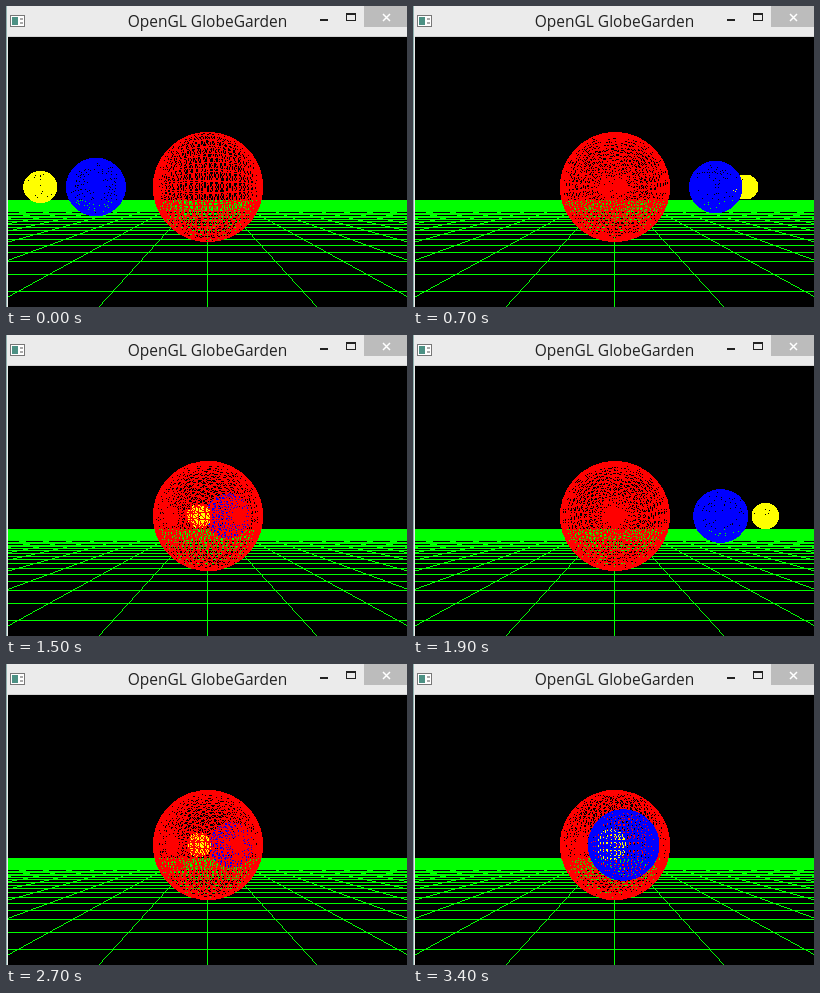
Recreate the animation shown at these times as an HTML page with a canvas. Size 401 by 301 pixels, loop 3500 ms.

```html
<!DOCTYPE html>
<html lang="en">
<head>
<meta charset="utf-8">
<title>OpenGL GlobeGarden</title>
<style>
  html, body { margin: 0; width: 100%; height: 100%; overflow: hidden; background: #000; }
  canvas, svg { position: absolute; left: 0; top: 0; display: block; }
  text { font: 15.5px "Open Sans", "Noto Sans", sans-serif; fill: #222; }
</style>
</head>
<body>
<canvas id="scene" width="401" height="301"></canvas>
<svg width="401" height="301" viewBox="0 0 401 301">
  <g shape-rendering="crispEdges">
    <rect width="401" height="31" fill="#ebebeb"/>
    <rect y="30" width="401" height="1" fill="#d4d4d4"/>
    <rect width="1" height="301" fill="#8fb0ae"/>
    <rect x="1" width="1" height="301" fill="#ebebeb"/>
    <rect x="4" y="9" width="15" height="12" fill="#777"/>
    <rect x="5" y="10" width="13" height="10" fill="#fff"/>
    <rect x="6" y="11" width="6" height="8" fill="#4c9184"/>
    <rect x="14" y="12" width="3" height="2" fill="#aaa"/>
    <rect x="14" y="16" width="3" height="2" fill="#aaa"/>
    <rect x="314" y="13" width="8" height="2" fill="#222"/>
    <path d="M340 7h10v8h-10zM341 9v5h8v-5z" fill="#222" fill-rule="evenodd"/>
    <rect x="358" width="43" height="21" fill="#bcbcbc"/>
  </g>
  <path d="M377 8l7 7m0-7l-7 7" stroke="#fff" stroke-width="1.5"/>
  <text x="201.5" y="21" text-anchor="middle">OpenGL GlobeGarden</text>
</svg>
<script>
const W = 401, H = 301, TOP = 31;
const CX = 201.99, CY = 181, FOCAL = 150 / Math.tan(17.5 * Math.PI / 180);
const FRAME_MS = 100, FRAMES = 35, DISTANCE = 3.5;
const RED = 0xff0000ff, BLUE = 0xffff0000, YELLOW = 0xff00ffff, GREEN = 0xff00ff00, BLACK = 0xff000000;

// Orbit angle in degrees at [frame, angle]; 0 points right, -90 at the viewer.
const ORBIT = [
  [0, -165.5], [3, -217.5], [6, -323], [8, -370], [10, -435], [12, -453],
  [15, -643], [18, -690], [20, -737.5], [22, -798.7], [24, -815],
  [27, -1005], [30, -1053.5], [32, -1102.5], [34, -1166.5]
];

const ctx = document.getElementById("scene").getContext("2d");
const image = ctx.createImageData(W, H);
const pixels = new Uint32Array(image.data.buffer);
const depth = new Float32Array(W * H);

// Screen position and inverse distance of a point in space.
function project(x, y, z) {
  return [CX + FOCAL * x / z, CY - FOCAL * y / z, 1 / z];
}

// One pixel wide line without smoothing, tested against the depth buffer.
function line(a, b, color) {
  const dx = b[0] - a[0], dy = b[1] - a[1], dw = b[2] - a[2];
  const major = Math.abs(dx) >= Math.abs(dy) ? 0 : 1;
  const span = major ? dy : dx;
  if (!span) return;
  const limit = major ? H : W;
  const first = Math.max(0, Math.round(Math.min(a[major], b[major])));
  const last = Math.min(limit, Math.round(Math.max(a[major], b[major])));
  for (let p = first; p < last; p++) {
    const t = (p + 0.5 - a[major]) / span;
    const x = major ? Math.floor(a[0] + dx * t) : p;
    const y = major ? p : Math.floor(a[1] + dy * t);
    if (x < 0 || x >= W || y < TOP || y >= H) continue;
    const i = y * W + x, w = a[2] + dw * t;
    if (w > depth[i]) {
      depth[i] = w;
      pixels[i] = color;
    }
  }
}

function drawFloor() {
  const y = -0.55, far = 20, near = 1.5;
  for (let s = -20; s <= 20; s += 0.5) {
    line(project(s, y, far), project(s, y, near), GREEN);
    if (s >= near) line(project(-20, y, s), project(20, y, s), GREEN);
  }
}

// Triangulated sphere whose polar axis is horizontal and turned by yaw.
function drawSphere([cx, cz], radius, slices, stacks, yaw, color) {
  const sin = Math.sin(yaw), cos = Math.cos(yaw);
  const rings = [];
  for (let i = 0; i <= stacks; i++) {
    const rho = Math.PI * i / stacks;
    const r = radius * Math.sin(rho), axial = radius * Math.cos(rho);
    rings.push(Array.from({ length: slices + 1 }, (_, j) => {
      const theta = 2 * Math.PI * j / slices;
      const side = -r * Math.sin(theta);
      return project(cx + side * cos + axial * sin, r * Math.cos(theta), cz + side * sin - axial * cos);
    }));
  }
  for (let i = 0; i < stacks; i++) {
    const upper = rings[i], lower = rings[i + 1];
    for (let j = 0; j < slices; j++) {
      line(upper[j], lower[j], color);
      line(lower[j], lower[j + 1], color);
      line(lower[j], upper[j + 1], color);
    }
  }
}

function orbitAngle(frame) {
  const k = Math.max(1, ORBIT.findIndex(key => key[0] >= frame));
  const [f0, a0] = ORBIT[k - 1], [f1, a1] = ORBIT[k];
  return (a0 + (a1 - a0) * (frame - f0) / (f1 - f0)) * Math.PI / 180;
}

function orbit([cx, cz], radius, angle) {
  return [cx + radius * Math.cos(angle), cz + radius * Math.sin(angle)];
}

pixels.fill(BLACK);
drawFloor();
const floorPixels = pixels.slice(), floorDepth = depth.slice();

function render(frame) {
  const angle = orbitAngle(frame), moonAngle = 3 * angle;
  const center = [0, DISTANCE];
  const planet = orbit(center, 0.8, angle);
  const moon = orbit(planet, 0.4, moonAngle);
  pixels.set(floorPixels);
  depth.set(floorDepth);
  drawSphere(center, 0.4, 30, 30, -angle / 2, RED);
  drawSphere(planet, 0.2, 26, 26, angle, BLUE);
  drawSphere(moon, 0.1, 26, 13, moonAngle, YELLOW);
  ctx.putImageData(image, 0, 0);
}

const start = performance.now();
let shown = -1;
function tick() {
  const frame = Math.floor((performance.now() - start) / FRAME_MS) % FRAMES;
  if (frame !== shown) render(shown = frame);
  requestAnimationFrame(tick);
}
tick();
</script>
</body>
</html>
```
